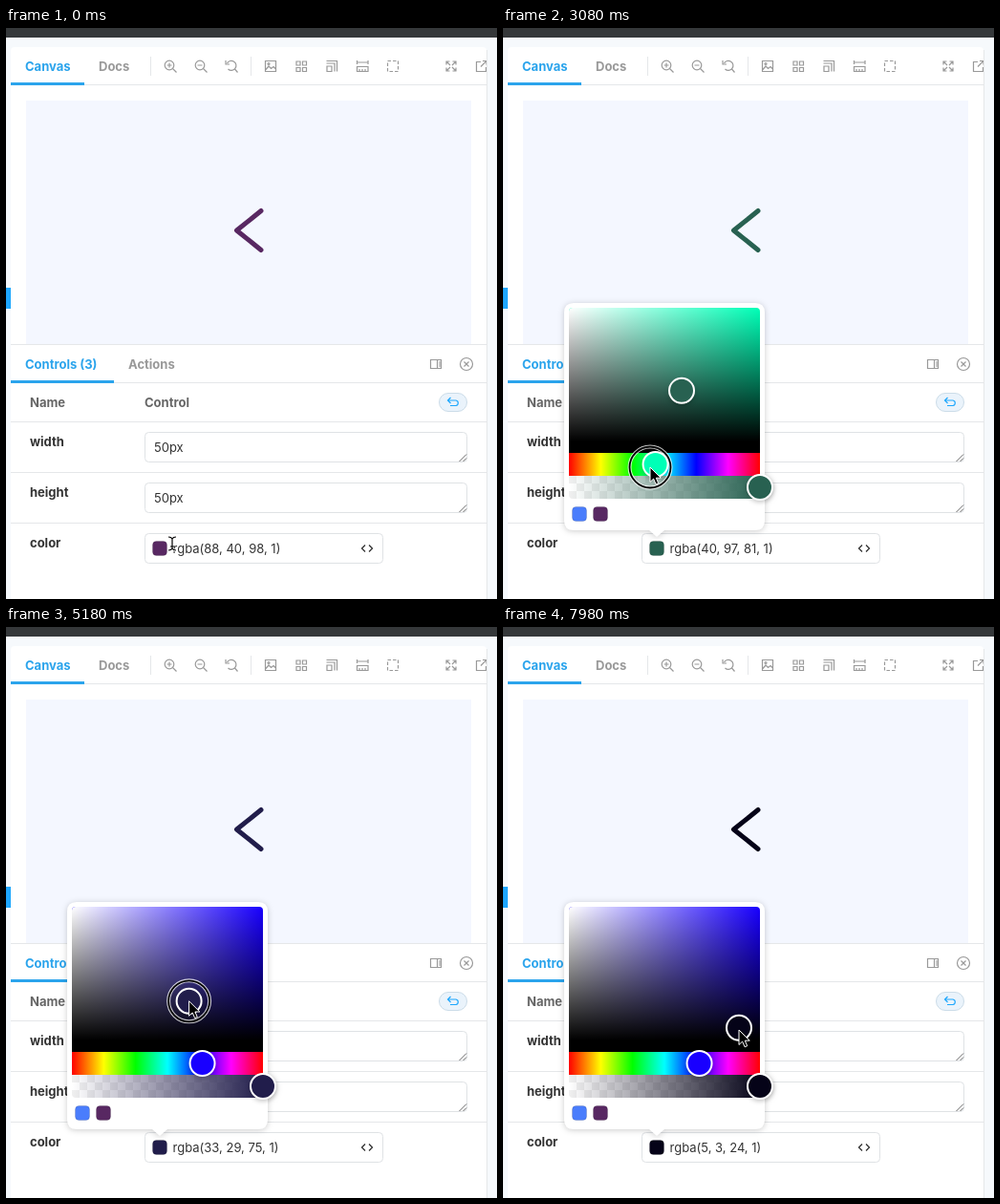
An HTML page for the animation above (8 s loop, 514 by 598 pixels).

```html
<!DOCTYPE html>
<html lang="en">
<head>
<meta charset="utf-8">
<title>Color control</title>
<style>
  html, body { margin: 0; width: 100%; height: 100%; overflow: hidden; background: #f6f9fc; }
  svg { display: block; width: 100vw; height: 100vh; font: 13px Inter, sans-serif; fill: none; }
  .bold { font-weight: 700; fill: #999; }
  .head { fill: #666; }
  .label { fill: #333; }
  .active { fill: #2ba4ec; }
  .value { fill: #333; }
  .icon { stroke: #999; stroke-width: 1.2; }
  .rule { stroke: #e5e7e9; }
  .field { fill: #fff; stroke: #dfe2e5; }
  .grip { stroke: #666; }
  .edge { stroke: #000; stroke-opacity: .12; }
  .thumb { stroke: #fff; stroke-width: 2; filter: drop-shadow(0 2px 2px #0003); }
  #popup { filter: drop-shadow(0 1px 3px #0003); }
</style>
</head>
<body>
<svg viewBox="0 0 514 598">
  <defs>
    <linearGradient id="whiten"><stop stop-color="#fff"/><stop offset="1" stop-color="#fff" stop-opacity="0"/></linearGradient>
    <linearGradient id="darken" x2="0" y2="1"><stop stop-opacity="0"/><stop offset="1"/></linearGradient>
    <linearGradient id="rainbow">
      <stop stop-color="#f00"/><stop offset=".1667" stop-color="#ff0"/><stop offset=".3333" stop-color="#0f0"/>
      <stop offset=".5" stop-color="#0ff"/><stop offset=".6667" stop-color="#00f"/><stop offset=".8333" stop-color="#f0f"/>
      <stop offset="1" stop-color="#f00"/>
    </linearGradient>
    <linearGradient id="fade"><stop class="tint" stop-opacity="0"/><stop class="tint" offset="1"/></linearGradient>
    <pattern id="checker" x="69" y="469" width="16" height="16" patternUnits="userSpaceOnUse">
      <path d="M0 0h8v8H0zM8 8h8v8H8z" fill="#000" fill-opacity=".06"/>
    </pattern>
    <clipPath id="pickerClip"><rect x="69" y="293" width="200" height="200" rx="4"/></clipPath>
    <clipPath id="panelClip"><path d="M5 20h498v578H5z"/></clipPath>
  </defs>

  <!-- window and preview -->
  <path d="M0 0h514v598H0z" fill="#f6f9fc"/>
  <path d="M0 0h514v10H0z" fill="#35383a"/>
  <path d="M0 272h5v22H0z" fill="#1ea7fd"/>
  <path d="M5 598V24q0-4 4-4h490q4 0 4 4v574z" fill="#fff"/>
  <path class="rule" d="M503.5 23v575M5 59.5h498M151.5 30v20M256.5 30v20"/>
  <path d="M21 76h466v255H21z" fill="#f4f7ff"/>
  <path class="rule" d="M5 331.5h498M5 371.5h498M5 412.5h498M5 465.5h498M5 518.5h498"/>
  <path d="M5 57h77v3H5zM5 369h108v3H5z" fill="#2ba4ec"/>
  <path class="paint-stroke" d="M267 191.5 241.5 212 267 232.5" stroke-width="5" stroke-linecap="round" stroke-linejoin="round"/>

  <g class="bold">
    <text class="active" x="20" y="45">Canvas</text>
    <text x="97" y="45">Docs</text>
    <text class="active" x="20" y="357">Controls (3)</text>
    <text x="128" y="357">Actions</text>
    <text class="head" x="25" y="397">Name</text>
    <text class="head" x="145" y="397">Control</text>
    <text class="label" x="25" y="438">width</text>
    <text class="label" x="25" y="491">height</text>
    <text class="label" x="25" y="544">color</text>
  </g>

  <!-- toolbar icons -->
  <g class="icon" clip-path="url(#panelClip)">
    <g id="zoom"><circle cx="171" cy="39" r="4.8"/><path d="m174.5 42.5 4 4M168.5 39h5"/></g>
    <use href="#zoom" x="32"/>
    <path d="M171 36.5v5M231.5 37a5 5 0 1 1 1 6M230 34v4h4M239.500 43l3 3.500"/>
    <path d="M271.500 34.500h11v11h-11zM272 43.500l3-3.500 2.500 2.500 2.500-2 2.500 2.500"/><circle cx="275" cy="37.500" r="1"/>
    <path d="M304 35h4v4h-4zM310.500 35h4v4h-4zM304 41.500h4v4h-4zM310.500 41.500h4v4h-4z"/>
    <path d="M335.500 34.500h11v11M335.500 37h8.500v8.500M336 40h5v5.500h-5z"/>
    <path d="M367.500 40.500h11.500v5h-11.500zM370 43v2.500M373 43v2.500M376 43v2.500M367.500 34v4M379 34v4M368 36h11"/>
    <path d="M399.500 34.500h11v11h-11z" stroke-dasharray="3.500 2"/>
    <path d="M461 38.500V35h3.500M467.500 35h3.500v3.500M471 41.500V45h-3.500M464.500 45H461v-3.500M461 35l4 4M471 35l-4 4M471 45l-4-4M461 45l4-4"/>
    <path d="M497 35.500h-4.500v10h10V41M499 34.500h4v4M503 34.500l-6 6"/>
    <path d="M444.500 347.500h11v9h-11zM451.500 347.500v9M453 350h2M453 352h2M453 354h2"/>
    <circle cx="482" cy="352" r="6.500"/><path d="m479.500 349.500 5 5m0-5-5 5"/>
  </g>
  <rect x="453.500" y="382.500" width="29" height="19" rx="9.500" fill="#eaf3fb" stroke="#cbdce8"/>
  <path d="m465.500 387-3 3 3 3M463 390h8a2.800 2.800 0 0 1 0 5.500h-6" stroke="#1ea7fd" stroke-width="1.200"/>

  <!-- inputs -->
  <g id="area"><rect class="field" x="145.500" y="423.500" width="337" height="31" rx="4"/>
    <path class="grip" d="m474.500 454 7.500-7.500m-3.500 7.500 3.500-3.500"/>
    <text class="value" x="155" y="444">50px</text></g>
  <use href="#area" y="53"/>
  <rect class="field" x="145.500" y="529.500" width="249" height="31" rx="4"/>
  <rect class="paint edge" x="153.500" y="537.500" width="15" height="15" rx="4"/>
  <text class="value" id="rgba" x="174.500" y="550"></text>
  <path d="m376 541.500-3.500 3.500 3.500 3.500m4-7 3.500 3.500-3.500 3.500" stroke="#333" stroke-width="1.300"/>

  <!-- picker -->
  <g id="popup">
    <path d="M74 288h190q10 0 10 10v218q0 10-10 10h-95l-8 7-8-7H74q-10 0-10-10V298q0-10 10-10z" fill="#fff"/>
    <g clip-path="url(#pickerClip)">
      <path id="hueField" d="M69 293h200v140H69z"/>
      <path d="M69 293h200v140H69z" fill="url(#whiten)"/>
      <path d="M69 293h200v140H69z" fill="url(#darken)"/>
      <path d="M69 433h200v12H69z" fill="#000"/>
      <path d="M69 445h200v24H69z" fill="url(#rainbow)"/>
      <path d="M69 469h200v24H69z" fill="url(#checker)"/>
      <path d="M69 469h200v24H69z" fill="url(#fade)"/>
    </g>
    <circle class="thumb paint" id="shadeThumb" r="13"/>
    <circle class="thumb" id="hueThumb" cy="457" r="13"/>
    <circle class="thumb paint" cx="269" cy="481" r="13"/>
    <rect id="selected" x="91" y="498" width="22" height="22" rx="6" fill="#dcdcdc"/>
    <rect class="edge" x="72.500" y="501.500" width="15" height="15" rx="4" fill="#4a7dfc"/>
    <rect class="edge" x="94.500" y="501.500" width="15" height="15" rx="4" fill="#582862"/>
  </g>

  <g id="pointer">
    <g id="ring"><circle r="21.500" stroke="#fff" stroke-opacity=".75" stroke-width="4"/><circle r="21.500" stroke="#000" stroke-width="1.800"/></g>
    <path id="arrow" d="M0 0v15.500l3.600-3.400 2.500 5.700 2.600-1.100-2.400-5.500h4.900z" fill="#000" stroke="#fff"/>
    <g id="beam"><path id="beamLine" d="M-4-7q3 0 4 2 1-2 4-2M0-5V5M-4 7q3 0 4-2 1 2 4 2M-2 3h4" stroke="#fff" stroke-width="2.600"/>
      <path d="M-4-7q3 0 4 2 1-2 4-2M0-5V5M-4 7q3 0 4-2 1 2 4 2M-2 3h4" stroke="#000" stroke-width="1.200"/></g>
  </g>
</svg>
<script>
const LOOP = 8000, STEP = 70;
const OPEN = 700;
const HUE_DRAG = [2590, 4480], SHADE_DRAG = [5180, 7770];
const FIELD = { x: 69, y: 293, w: 200, h: 140 };

// Pointer path: time, x, y
const path = [
  [0, 174, 540], [140, 174, 540], [490, 161, 546], [840, 161, 546],
  [1050, 185, 397.5], [1330, 222, 388], [1680, 253, 425], [1960, 192, 388],
  [2240, 198, 480], [2520, 231, 459], [2590, 230, 459],
  [3010, 159.56, 460], [3080, 154, 460], [3570, 92, 462], [3780, 94, 462],
  [3850, 109.55, 463], [3920, 117, 463], [4410, 205.11, 460], [4550, 206, 460],
  [4620, 240, 466], [5110, 191, 391], [5180, 191.6, 391.8],
  [5740, 97, 345], [6020, 90, 328], [6090, 101.1, 322.1], [6160, 115, 316],
  [6580, 190, 306], [7000, 248, 330], [7420, 240, 385],
  [7770, 247, 419.8], [7840, 254, 418], [7980, 247, 422], [LOOP, 247, 422]
];

const $ = id => document.getElementById(id);
const all = selector => document.querySelectorAll(selector);
const clamp = (v, lo, hi) => Math.min(hi, Math.max(lo, v));
const show = (id, on) => $(id).setAttribute("display", on ? "inline" : "none");

function pointerAt(t) {
  const i = path.findIndex(key => key[0] > t);
  const [t0, x0, y0] = path[i - 1], [t1, x1, y1] = path[i];
  const k = (t - t0) / (t1 - t0);
  return { x: x0 + (x1 - x0) * k, y: y0 + (y1 - y0) * k };
}

// The picked value trails the pointer by one step.
const dragged = (t, [from, to]) => pointerAt(clamp(t - STEP, from, to));

function hsv(h, s, v) {
  const channel = n => {
    const k = (n + h / 60) % 6;
    return Math.round(255 * v * (1 - s * clamp(Math.min(k, 4 - k), 0, 1)));
  };
  return `rgba(${channel(5)}, ${channel(3)}, ${channel(1)}, 1)`;
}

function draw(t) {
  const pointer = pointerAt(t);
  const untouched = t < HUE_DRAG[0];
  let hue = 290, s = 0.59, v = 0.38;
  if (!untouched) hue = (dragged(t, HUE_DRAG).x - FIELD.x) / FIELD.w * 360;
  if (t >= SHADE_DRAG[0]) {
    const p = dragged(t, SHADE_DRAG);
    s = clamp((p.x - FIELD.x) / FIELD.w, 0, 1);
    v = clamp(1 - (p.y - FIELD.y) / FIELD.h, 0, 1);
  }
  const color = untouched ? "rgba(88, 40, 98, 1)" : hsv(hue, s, v);
  const pure = hsv(hue, 1, 1);

  $("rgba").textContent = color;
  all(".paint").forEach(el => el.style.fill = color);
  all(".paint-stroke").forEach(el => el.style.stroke = color);
  all(".tint").forEach(el => el.style.stopColor = color);
  $("hueField").style.fill = $("hueThumb").style.fill = pure;
  $("hueThumb").setAttribute("cx", FIELD.x + hue / 360 * FIELD.w);
  $("shadeThumb").setAttribute("cx", FIELD.x + s * FIELD.w);
  $("shadeThumb").setAttribute("cy", FIELD.y + (1 - v) * FIELD.h);

  const presses = [[420, OPEN], [HUE_DRAG[0], 4620], [SHADE_DRAG[0], 7840]];
  show("popup", t >= OPEN);
  show("selected", untouched);
  show("ring", presses.some(([from, to]) => t >= from && t < to));
  show("beam", t < 280);
  show("arrow", t >= 280);
  $("pointer").setAttribute("transform", `translate(${pointer.x} ${pointer.y})`);
}

function tick() {
  const t = performance.now() % LOOP;
  draw(Math.floor(t / STEP) * STEP);
  requestAnimationFrame(tick);
}
tick();
</script>
</body>
</html>
```
